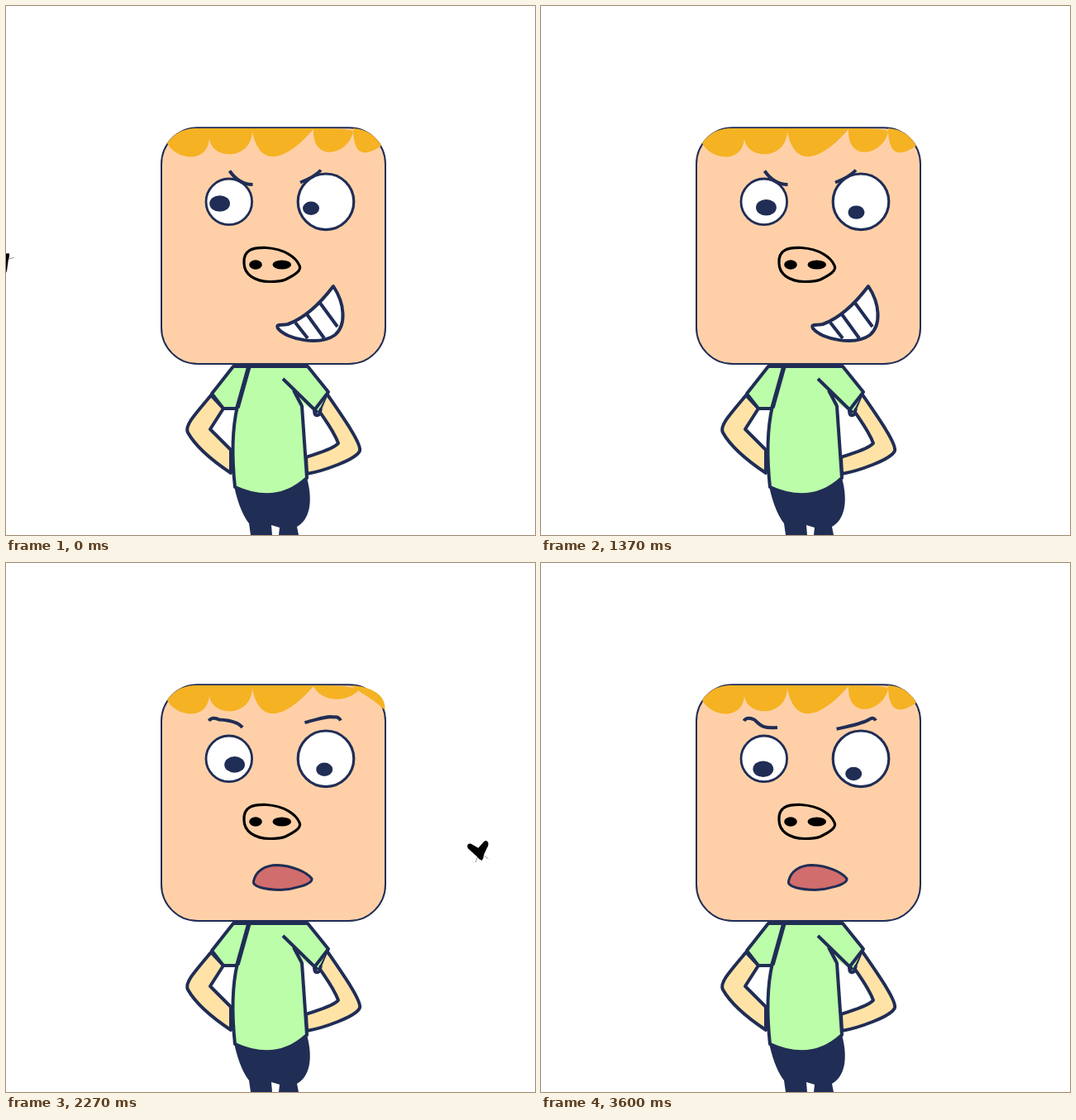
An HTML page with a canvas that plays this animation: 640 px wide and 640 px high, repeating every 3.93 s.

```html
<!DOCTYPE html>
<html lang="en">
<head>
<meta charset="utf-8">
<title>Boy and fly</title>
<style>
  html, body { margin: 0; width: 100%; height: 100%; overflow: hidden; background: #fff; }
  canvas { display: block; width: 640px; height: 640px; }
</style>
</head>
<body>
<canvas id="stage" width="640" height="640"></canvas>
<script>
const ctx = document.getElementById('stage').getContext('2d');
const LOOP = 3930;
const SHUT_AT = 1500, REOPEN_AT = 2090;
const NAVY = '#202d55', SKIN = '#ffd0a8', HAIR = '#f5b223';
const SHIRT = '#bbfda9', ARM = '#ffe3a6', LIPS = '#d16d6d';

// Progress from 0 to 1 between two times
const ramp = (t, from, to) => Math.min(1, Math.max(0, (t - from) / (to - from)));
const ease = (t, from, to) => {
  const u = ramp(t, from, to);
  return u * u * (3 - 2 * u);
};

function shape(d, fill, stroke, width) {
  const path = new Path2D(d);
  if (fill) { ctx.fillStyle = fill; ctx.fill(path); }
  if (stroke) { ctx.strokeStyle = stroke; ctx.lineWidth = width; ctx.stroke(path); }
}

function oval(x, y, rx, ry, fill, stroke, width) {
  ctx.beginPath();
  ctx.ellipse(x, y, rx, ry, 0, 0, Math.PI * 2);
  ctx.fillStyle = fill;
  ctx.fill();
  if (stroke) { ctx.strokeStyle = stroke; ctx.lineWidth = width; ctx.stroke(); }
}

// Swoops in from the left and rises behind the head
function approach(t) {
  const u = t / 730;
  return [118 * u ** 1.6 - 4, 308 + 175 * Math.exp(-(((u - 1.2) / 0.49) ** 2))];
}

// Leaves on the right, turns round and sinks behind the shirt
function comeBack(t) {
  const turn = (t - 2120) / 1000, low = (t - 2000) / 1000;
  return [
    575 - (turn < 0 ? 420 * turn ** 2 : 164 * turn ** 2.2),
    316 + (low < 0 ? 440 * low ** 2 : 120 * low)
  ];
}

function drawFly(t) {
  const behindHead = t > 1180 && t < 1530;
  if (behindHead || t > 3330) return;
  const [x, y] = t < 1500 ? approach(t) : comeBack(t);
  const degrees = -50 + 50 * ramp(t, 0, 730) + 23 * ramp(t, 730, 1970)
    + 112 * ramp(t, 1970, 2630) + 32 * ramp(t, 2630, 3130);
  ctx.save();
  ctx.translate(x, y);
  ctx.rotate(degrees * Math.PI / 180);
  shape('M5-3L12-8M5 3L12 8', null, '#777', 0.7);
  shape('M12 0Q10-3 6-4L-3-12C-7-15-12-12-9-8L-4 0L-11 7C-14 11-9 14-5 11L6 4Q10 3 12 0Z', '#000');
  ctx.restore();
}

function drawBody() {
  shape('M248 471C226 497 216 508 220 516C230 534 254 553 272 565L272 537L247 512L263 487Z', ARM, NAVY, 4);
  shape('M388 469C408 498 430 529 428 538C424 549 382 563 364 566L363 546C377 541 396 536 402 529C397 515 387 502 379 490Z', ARM, NAVY, 4);
  shape('M276 581C281 605 289 620 294 626L296 640L322 640L321 628L331 631L330 640L354 640L352 630C367 622 372 600 364 571C345 588 320 594 300 589Z', NAVY);
  shape('M294 436L275 436L249 469L263 487L280 487Z', SHIRT, NAVY, 4);
  shape('M294 436L365 436L390 467L377 492L357 480C360 510 362 550 364 571C335 598 303 594 277 582C273 545 274 510 280 484', SHIRT);
  shape('M294 436L365 436L390 467L373 489Q373 498 379 494L381 487M335 451L377 492M348 465L358 484L364 571C335 598 303 594 277 582C273 545 274 510 280 484', null, NAVY, 4);
  shape('M292 436L296 436L282 486L278 486Z', NAVY, NAVY, 1.5);
}

function drawHair(t) {
  const ruffle = ease(t, 1450, 1970) * (1 - ramp(t, 1970, 3600)) ** 1.4;
  const mix = (rest, blown) => rest + (blown - rest) * ruffle;
  shape('M195 166C205 186 244 192 246 160C248 186 296 188 298 152C308 202 344 182 372 149L372 148L228 148C212 149 203 155 195 166Z', HAIR);
  shape(`M372 149C${mix(370, 385)} ${mix(190, 160)} ${mix(414, 406)} ${mix(181, 166)}
    ${mix(420, 427)} ${mix(152, 157)}C${mix(420, 430)} 150 410 148 372 148Z`, HAIR);
  shape(`M420 151C${mix(421, 435)} ${mix(184, 149)} ${mix(437, 450)} ${mix(181, 162)}
    ${mix(454, 460)} ${mix(169, 181)}C${mix(447, 464)} ${mix(157, 163)} ${mix(437, 450)} ${mix(149, 152)} 420 148Z`, HAIR);
}

function drawHead(t) {
  ctx.beginPath();
  ctx.roundRect(188, 147.3, 271, 285.7, 44);
  ctx.fillStyle = SKIN;
  ctx.fill();
  ctx.strokeStyle = NAVY;
  ctx.lineWidth = 2;
  ctx.stroke();
  drawHair(t);
}

function drawEyes(t) {
  const dx = 10.5 * ramp(t, 0, 730) + 7.5 * ramp(t, 730, 2170) - 7.8 * ease(t, 2400, 3300);
  const dy = 12 * ramp(t, 0, 730) - 7.2 * ease(t, 730, 1370) + 5.4 * ease(t, 2170, 3400);
  oval(269.8, 236.8, 27.8, 27.8, '#fff', NAVY, 2.8);
  oval(387, 236.8, 33.8, 33.8, '#fff', NAVY, 3.2);
  oval(258.6 + dx, 239 + dy, 12.4, 9.8, NAVY);
  oval(369 + dx * 0.9, 244.8 + dy, 10, 8.2, NAVY);
}

function drawShutEyes() {
  shape('M250 217L303 247M264 244L281 221M346 257L401 212M353 219L383 251', null, NAVY, 4);
}

function drawSlyBrows() {
  shape('M270.5 199.5Q282 216 298.5 216M356 213.5Q373 207 381 198.5', null, NAVY, 4);
}

function drawWorriedBrows(t) {
  const sag = Math.min(1.2, (t - 2630) / 500);
  shape(`M245.5 191C248 187 253 187 258 189.5C265 ${192 + 3 * sag} ${275 - 7 * sag} ${194.5 + 5 * sag} 286 199
    M${360 - 2 * sag} ${196 + 4 * sag}C376 ${192 + 4 * sag} 388 ${188.5 + 5 * sag} 397 ${187.5 + 1.5 * sag}Q402 185.5 405 190.5`, null, NAVY, 4);
}

function drawNose() {
  shape('M288 311C287 295 298 292 315 292.5C337 294 351 304 355 314C358 320 350 325 338 331C332 333.5 325 333.5 319 333.5C301 333 288 325 288 311Z', null, '#000', 3.2);
  oval(302, 313, 7.8, 5.8, '#000');
  oval(333.8, 313, 11.3, 5.6, '#000');
}

function drawGrin() {
  shape('M396 339C410 360 412 386 398 398C380 411 340 404 329 390C326 384 333 387 341 385C360 378 380 360 396 339Z', '#fff', NAVY, 4);
  shape('M350 383L365 402M364 373L385 402M379 358L401 388', null, NAVY, 4);
}

function drawLips() {
  shape('M299.5 385C302 373 313 365.5 328 365.5C346 366 364 374 370 382C371 389 347 395 332 395.5C314 395 298 392 299.5 385Z', LIPS, NAVY, 3);
}

function draw(t) {
  ctx.fillStyle = '#fff';
  ctx.fillRect(0, 0, 640, 640);
  ctx.lineJoin = 'round';
  drawFly(t);
  drawBody();
  drawHead(t);
  drawNose();
  if (t < REOPEN_AT) drawGrin(); else drawLips();
  if (t >= SHUT_AT && t < REOPEN_AT) {
    drawShutEyes();
  } else {
    drawEyes(t);
    if (t < SHUT_AT) drawSlyBrows(); else drawWorriedBrows(t);
  }
}

const start = performance.now();
function tick() {
  draw((performance.now() - start) % LOOP);
  requestAnimationFrame(tick);
}
tick();
</script>
</body>
</html>
```
